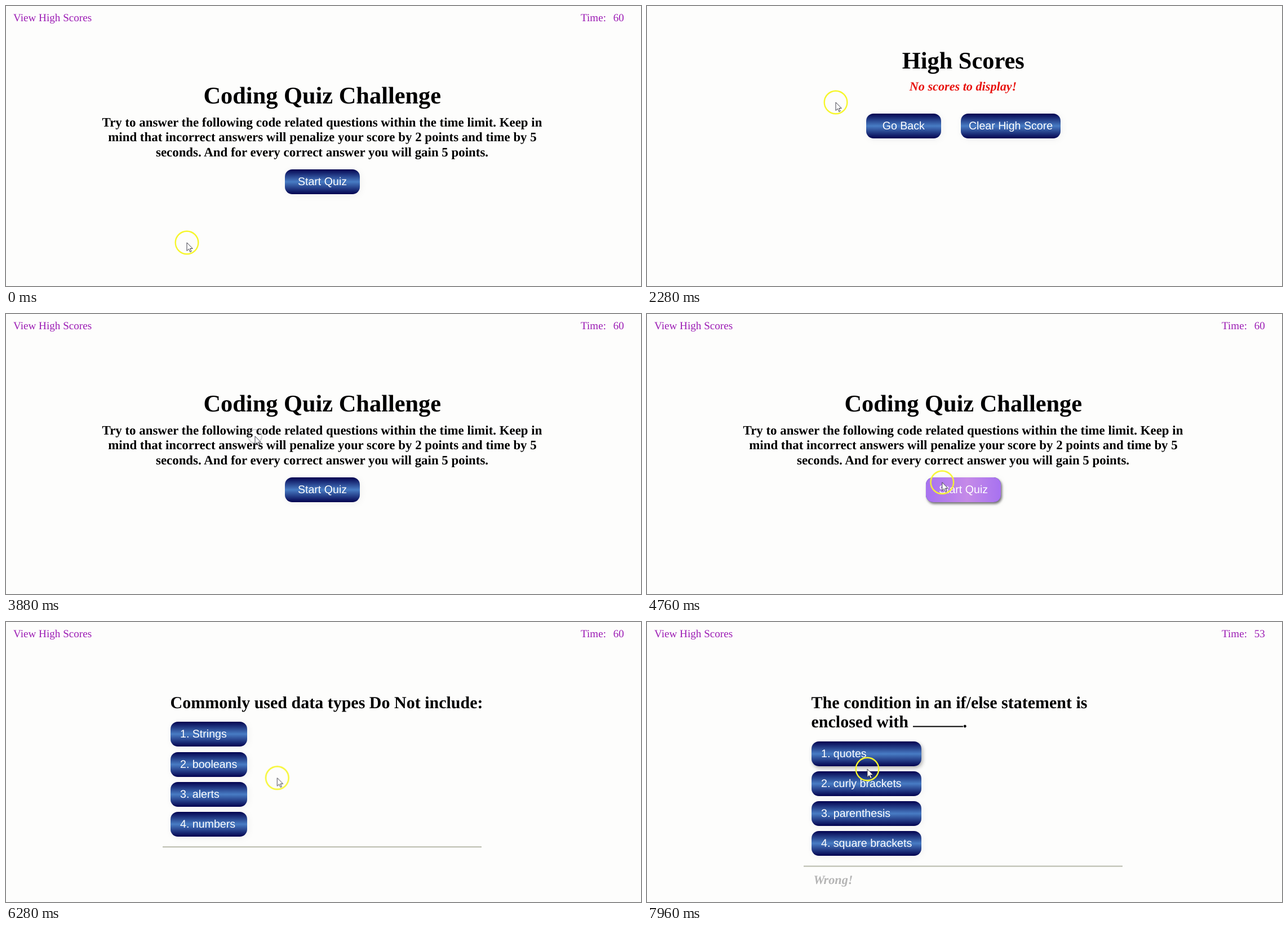
Write an HTML page that moves like this. It is 1127x497 px and loops after 8 s.

```html
<!DOCTYPE html>
<html lang="en">
<head>
<meta charset="utf-8">
<title>Coding Quiz Challenge</title>
<style>
html, body { margin: 0; width: 100%; height: 100%; overflow: hidden; background: #fdfdfc; }
.stage { position: relative; width: 1127px; height: 497px; overflow: hidden; }
.page, svg.layer { position: absolute; left: 0; top: 0; width: 1127px; height: 497px; }

text { font-family: "Liberation Serif", "Times New Roman", serif; text-rendering: geometricPrecision; }
.bar { font-size: 19.15px; fill: #9c1cb4; }
.title { font-size: 42.4px; font-weight: bold; text-anchor: middle; }
.intro { font-size: 22.9px; font-weight: bold; text-anchor: middle; }
.ask { font-size: 30px; font-weight: bold; }
.note { font-size: 22.2px; font-weight: bold; font-style: italic; }

.btn {
  position: absolute; height: 44px; border-radius: 13px; box-sizing: border-box;
  font: 19.6px/44px "Liberation Sans", Arial, sans-serif; color: #fff;
  text-align: center; white-space: nowrap; text-rendering: geometricPrecision;
  background: linear-gradient(#03034f, #487cc4 50%, #03034f);
  box-shadow: 2px 2px 14px rgba(0, 0, 0, .05);
}
.list .btn { left: 292px; padding-left: 17px; text-align: left; }
.list .btn:nth-of-type(1) { top: 0; }
.list .btn:nth-of-type(2) { top: 53.2px; }
.list .btn:nth-of-type(3) { top: 106.3px; }
.list .btn:nth-of-type(4) { top: 159.5px; }
.list { position: absolute; left: 0; }
.lift { box-shadow: 2px 3px 7px rgba(0, 0, 0, .32); }
.hot {
  background: linear-gradient(90deg, #a772f0, #c58ae8 55%, #a772f0);
  box-shadow: 2px 3px 4px rgba(0, 0, 0, .55);
}

/* every clock is the same 8 s loop */
.flip { animation: 8s step-end infinite; }
.top { animation-name: top; }
.home { animation-name: home; }
.scores { animation-name: scores; }
.q1 { animation-name: q1; }
.q2 { animation-name: q2; }
.back-hot { animation-name: backHot; }
.start-hot { animation-name: startHot; }
.q1-lift { animation-name: q1Lift; }
.count { animation-name: count; }
.halo { animation-name: halo; }
.hand { animation-name: hand; }
.arrow { animation-name: arrow; }

@keyframes top { 0%, 46.5% { opacity: 1 } 18.5% { opacity: 0 } }
@keyframes home { 0%, 46.5% { opacity: 1 } 18.5%, 69%, 100% { opacity: 0 } }
@keyframes scores { 0%, 46.5%, 100% { opacity: 0 } 18.5% { opacity: 1 } }
@keyframes q1 { 0%, 89.5%, 100% { opacity: 0 } 69% { opacity: 1 } }
@keyframes q2 { 0% { opacity: 0 } 89.5%, 100% { opacity: 1 } }
@keyframes backHot { 0%, 46.5%, 100% { opacity: 0 } 33% { opacity: 1 } }
@keyframes startHot { 0%, 69%, 100% { opacity: 0 } 59.5% { opacity: 1 } }
@keyframes q1Lift {
  0% { box-shadow: 2px 2px 14px rgba(0, 0, 0, .05) }
  82%, 100% { box-shadow: 2px 3px 7px rgba(0, 0, 0, .32) }
}
@keyframes count {
  0% { transform: translateY(0) }
  81.5% { transform: translateY(-30px) }
  89.5% { transform: translateY(-60px) }
  94%, 100% { transform: translateY(-90px) }
}
@keyframes halo {
  0%, 21.5%, 49.5%, 71.5%, 92.5%, 100% { opacity: 1 }
  17.5%, 45.5%, 67.5%, 88.5% { opacity: 0 }
}
@keyframes hand { 0%, 18.5%, 100% { opacity: 0 } 8.75% { opacity: 1 } }
@keyframes arrow { 0%, 18.5%, 100% { opacity: 1 } 8.75% { opacity: 0 } }

.pointer { animation: travel 8s ease-in-out infinite; }
@keyframes travel {
  0%, .5% { transform: translate(321px, 420px) }
  5.5%, 7.5% { transform: translate(98px, 42px) }
  12%, 20% { transform: translate(120px, 27px) }
  28.5% { transform: translate(335px, 171px) }
  36%, 53% { transform: translate(442px, 217px) }
  62.5%, 73.5% { transform: translate(545px, 320px) }
  85%, 94.5% { transform: translate(382px, 209px) }
  99.5%, 100% { transform: translate(391px, 261px) }
}

.click { fill: none; stroke-width: 2; animation: click 8s linear infinite; }
@keyframes click {
  0% { r: 5px; opacity: 1; stroke: #3319b4 }
  3% { r: 12px; opacity: .4; stroke: #8c8c94 }
  4%, 100% { r: 14px; opacity: 0; stroke: #8c8c94 }
}
</style>
</head>
<body>
<div class="stage">

  <svg class="layer flip top">
    <text class="bar" x="13" y="27">View High Scores</text>
    <text class="bar" x="1020" y="27">Time:</text>
    <svg x="1070" y="5" width="40" height="30" overflow="hidden">
      <g class="flip count">
        <text class="bar" x="7.7" y="22">60</text>
        <text class="bar" x="7.7" y="52">59</text>
        <text class="bar" x="7.7" y="82">54</text>
        <text class="bar" x="7.7" y="112">53</text>
      </g>
    </svg>
  </svg>

  <div class="page flip home">
    <svg class="layer">
      <text class="title" x="561.3" y="173">Coding Quiz Challenge</text>
      <text class="intro" x="561" y="213.5">Try to answer the following code related questions within the time limit. Keep in</text>
      <text class="intro" x="561.5" y="240">mind that incorrect answers will penalize your score by 2 points and time by 5</text>
      <text class="intro" x="561" y="266.5">seconds. And for every correct answer you will gain 5 points.</text>
    </svg>
    <div class="btn" style="left:495px;top:289.5px;width:133px">Start Quiz</div>
    <div class="btn hot flip start-hot" style="left:495px;top:289.5px;width:133px">Start Quiz</div>
  </div>

  <div class="page flip scores">
    <svg class="layer">
      <text class="title" x="561.3" y="111">High Scores</text>
      <text class="note" x="561" y="150" text-anchor="middle" fill="#e8120e">No scores to display!</text>
    </svg>
    <div class="btn" style="left:389px;top:191px;width:132.5px">Go Back</div>
    <div class="btn hot flip back-hot" style="left:389px;top:191px;width:132.5px">Go Back</div>
    <div class="btn" style="left:557px;top:191px;width:177px">Clear High Score</div>
  </div>

  <div class="page flip q1">
    <svg class="layer">
      <text class="ask" x="291.5" y="153">Commonly used data types Do Not include:</text>
      <path d="M278 399.3H844" stroke="#b8baab" stroke-width="2"/>
    </svg>
    <div class="list" style="top:177.4px">
      <div class="btn flip q1-lift" style="width:135.5px">1. Strings</div>
      <div class="btn" style="width:135.5px">2. booleans</div>
      <div class="btn" style="width:135.5px">3. alerts</div>
      <div class="btn" style="width:135.5px">4. numbers</div>
    </div>
  </div>

  <div class="page flip q2">
    <svg class="layer">
      <text class="ask" x="291.5" y="153">The condition in an if/else statement is</text>
      <text class="ask" x="291.5" y="187">enclosed with</text>
      <path d="M472 185.5H561" stroke="#000" stroke-width="2"/>
      <text class="ask" x="560.5" y="187">.</text>
      <path d="M278 433.5H844" stroke="#b8baab" stroke-width="2"/>
      <text class="note" x="295.5" y="465" fill="#b4b4b4">Wrong!</text>
    </svg>
    <div class="list" style="top:211.5px">
      <div class="btn lift" style="width:195px">1. quotes</div>
      <div class="btn" style="width:195px">2. curly brackets</div>
      <div class="btn" style="width:195px">3. parenthesis</div>
      <div class="btn" style="width:195px">4. square brackets</div>
    </div>
  </div>

  <svg class="layer">
    <g class="pointer">
      <circle class="flip halo" r="20.3" fill="none" stroke="#f6f62c" stroke-width="2.4"/>
      <circle class="click" style="animation-delay:-6600ms"/>
      <circle class="click" style="animation-delay:-4360ms"/>
      <circle class="click" style="animation-delay:-2600ms"/>
      <circle class="click" style="animation-delay:-920ms"/>
      <path class="flip arrow" d="M0 0V14.5L3.4 11.3 5.8 16.6 8 15.6 5.7 10.5H10.2Z" fill="#fff" stroke="#2b2b36" stroke-width=".9"/>
      <g class="flip hand" fill="#fff" stroke="#222" stroke-linejoin="round">
        <path d="M-1.5 12V1.5Q-1.5 0 0 0T1.5 1.5V7Q3.7 5.8 4.3 7.5 6 6.8 6.6 8.4 8.3 8 8.3 10V13Q8 16 6.5 18H-.5Q-2 15.5-5.2 12.2-6 10-3.8 10Z"/>
        <path d="M1.5 7V11M4.3 7.5V11M6.6 8.4V11.5" fill="none" stroke-width=".8"/>
      </g>
    </g>
  </svg>

</div>
</body>
</html>
```
